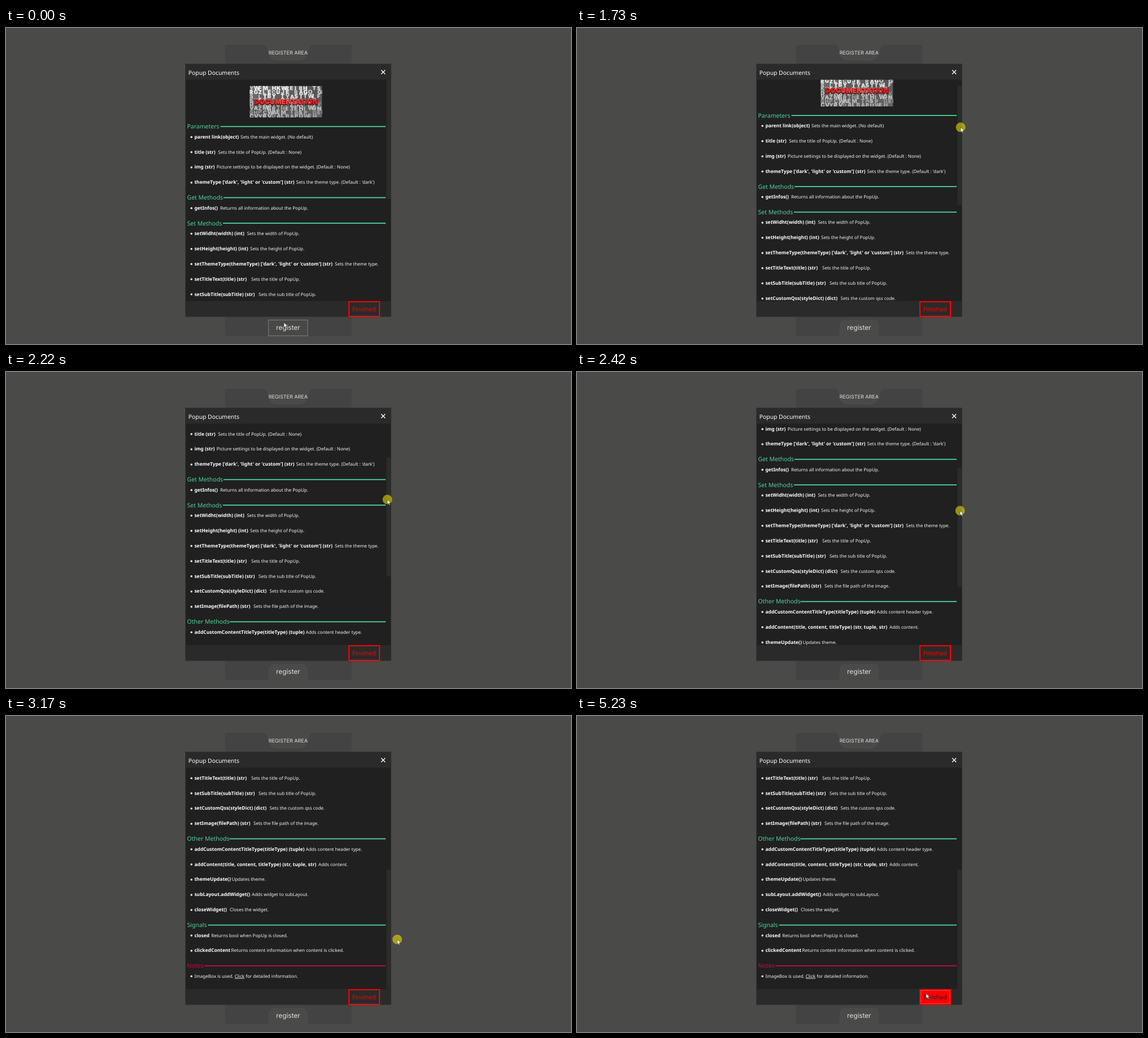
Recreate the animation shown at these times as an HTML page. Size 1000 by 560 pixels, loop 5.3 s.

```html
<!DOCTYPE html>
<html lang="en">
<head>
<meta charset="utf-8">
<title>Popup Documents</title>
<style>
  html, body { margin: 0; width: 100%; height: 100%; overflow: hidden; background: #4a4a48; }
  svg { display: block; width: 100%; height: 100%; }
  text { font-family: "Noto Sans", "Open Sans", sans-serif; white-space: pre; text-rendering: geometricPrecision; }
  .round { font-family: Inter, sans-serif; fill: #dde0e0; text-anchor: middle; }
  .head { font-size: 10.5px; }
  .name { font-size: 8.5px; font-weight: 700; fill: #fff; }
  .info { font-size: 8.05px; fill: #f6f6f6; }
  .link { text-decoration: underline; }
  .block { font-family: Inter, sans-serif; font-weight: 900; }
</style>
</head>
<body>
<svg id="stage" viewBox="0 0 1000 560" preserveAspectRatio="none">
  <defs>
    <clipPath id="view"><rect x="318" y="91.5" width="355" height="392.5"/></clipPath>
    <clipPath id="frame"><rect x="431.5" y="102.5" width="128" height="56"/></clipPath>
    <linearGradient id="slate" x2="1" y2="1">
      <stop offset="0" stop-color="#777"/>
      <stop offset=".5" stop-color="#555"/>
      <stop offset="1" stop-color="#666"/>
    </linearGradient>
    <linearGradient id="red" x2="1">
      <stop offset="0" stop-color="#dc1414"/>
      <stop offset=".5" stop-color="#f8504a"/>
      <stop offset="1" stop-color="#e01818"/>
    </linearGradient>
  </defs>

  <rect width="1000" height="560" fill="#4a4a48"/>
  <rect x="387.5" y="30" width="224" height="515.5" fill="#434343"/>
  <path d="M457 30C463 31 462 38 464 44Q468 58 481 58H518Q531 58 535 44C537 38 536 31 542 30Z" fill="#4a4a48"/>
  <text class="round" x="499.3" y="47.2" font-size="9">REGISTER AREA</text>
  <path id="tab" d="M464.5 545.5V529Q465 517 477 517H522Q534 517 534.5 529V545.5Z" fill="#4a4a48"/>
  <rect id="ring" x="464.5" y="517.5" width="69.5" height="28" fill="#484847" stroke="#7c8583" stroke-width=".9"/>
  <text class="round" x="499.3" y="535.4" font-size="11.8">register</text>

  <rect x="317.5" y="63.7" width="364" height="448.1" fill="#202020"/>
  <g clip-path="url(#view)"><g id="page"></g></g>
  <rect x="317.5" y="63.7" width="364" height="27.8" fill="#2a2a2a"/>
  <rect x="317.5" y="484" width="364" height="27.8" fill="#2a2a2a"/>
  <rect id="thumb" x="673.5" y="92" width="7.8" height="211" fill="#2b2b2b"/>
  <rect x="317.5" y="63.7" width="364" height="448.1" fill="none" stroke="#393939" stroke-width=".6"/>
  <text x="322.8" y="83.4" font-size="10.35" fill="#fff">Popup Documents</text>
  <path d="M664 74.5l7.2 7.2m0-7.2l-7.2 7.2" stroke="#fff" stroke-width="1.3"/>

  <rect id="button" x="607" y="485" width="54" height="26" stroke="#f00" stroke-width="2"/>
  <rect id="focus" x="608.5" y="486.5" width="51" height="23" fill="none" stroke="#ffa0a0" stroke-width=".8" stroke-dasharray="1 1"/>
  <text id="label" x="613" y="502" font-size="10.55">Finished</text>

  <g id="cursor">
    <circle id="press" r="8.5" fill="#fe0" fill-opacity=".53"/>
    <path d="M0 0V8.3L1.9 6.6L3.3 9.8L4.7 9.2L3.4 6.1H6Z" fill="#fff" stroke="#222" stroke-width=".5"/>
  </g>
</svg>
<script>
const $ = id => document.getElementById(id);
const LOOP = 5300, GREEN = '#4fd498', RED = '#d0063e';

function add(parent, tag, attrs, text) {
  const el = document.createElementNS('http://www.w3.org/2000/svg', tag);
  for (const k in attrs) el.setAttribute(k, attrs[k]);
  if (text) el.textContent = text;
  return parent.appendChild(el);
}

// heading, rule start, colour, items: [name, description, description x]
const sections = [
  ['Parameters', 379.5, GREEN, [
    ['parent link(object)', 'Sets the main widget. (No default)', 415],
    ['title (str)', 'Sets the title of PopUp. (Default : None)', 375.3],
    ['img (str)', 'Picture settings to be displayed on the widget. (Default : None)', 372.8],
    ["themeType ['dark', 'light' or 'custom'] (str)", "Sets the theme type. (Default : 'dark')", 513.6]]],
  ['Get Methods', 385, GREEN, [
    ['getInfos()', 'Returns all information about the PopUp.', 379]]],
  ['Set Methods', 384, GREEN, [
    ['setWidht(width) (int)', 'Sets the width of PopUp.', 426.4],
    ['setHeight(height) (int)', 'Sets the height of PopUp.', 432],
    ["setThemeType(themeType) ['dark', 'light' or 'custom'] (str)", 'Sets the theme type.', 582],
    ['setTitleText(title) (str)', 'Sets the title of PopUp.', 434],
    ['setSubTitle(subTitle) (str)', 'Sets the sub title of PopUp.', 447],
    ['setCustomQss(styleDict) (dict)', 'Sets the custom qss code.', 466.5],
    ['setImage(filePath) (str)', 'Sets the file path of the image.', 438]]],
  ['Other Methods', 395.5, GREEN, [
    ['addCustomContentTitleType(titleType) (tuple)', 'Adds content header type.', 530.5],
    ['addContent(title, content, titleType) (str, tuple, str)', 'Adds content.', 553],
    ['themeUpdate()', 'Updates theme.', 399.5],
    ['subLayout.addWidget()', 'Adds widget to subLayout.', 435],
    ['closeWidget()', 'Closes the widget.', 396]]],
  ['Signals', 357.5, GREEN, [
    ['closed', 'Returns bool when PopUp is closed.', 363.2],
    ['clickedContent', 'Returns content information when content is clicked.', 398.5]]],
  ['Notes', 351, RED, [['', 'ImageBox is used. ', 333.5]]]
];

function buildPicture(page) {
  const pic = add(page, 'g', { 'clip-path': 'url(#frame)' });
  add(pic, 'rect', { x: 431.5, y: 102.5, width: 128, height: 56, fill: 'url(#slate)' });
  const rows = ['YWFM HKWREIBH TS', 'RGZLECUJE RAGO GE', 'S LTBY TYASTTWIF', 'KWOTHE RGNEASLD',
    'D CNRTEFPENN PTV', 'VAZMBRTHEYEHIWGN', 'GHPCWAEM TASP GEH', 'CVYRVDALBAPUWEH'];
  let seed = 7;
  const rnd = () => (seed = seed * 16807 % 2147483647) / 2147483647;
  rows.forEach((row, r) => [...row].forEach((ch, i) => {
    const tone = Math.round((r < 3 ? 225 : 175) + (rnd() - .5) * 60);
    add(pic, 'text', {
      class: 'block', x: 430 + i * 8 + rnd(), y: 109.5 + r * 7.1 + rnd(),
      'font-size': 9 + rnd() * 1.5, fill: `rgb(${tone},${tone},${tone})`
    }, ch);
  }));
  const big = { class: 'block', x: 495.5, 'text-anchor': 'middle', 'font-size': 12.3 };
  add(pic, 'text', { ...big, y: 136, fill: '#5a0a0a', stroke: '#5a0a0a', 'stroke-width': 1.2 }, 'DOCUMENTATION');
  add(pic, 'text', { ...big, y: 134.8, fill: 'url(#red)' }, 'DOCUMENTATION');
}

function buildPage() {
  const page = $('page');
  buildPicture(page);
  let y = 174.4, info;
  for (const [title, rule, fill, items] of sections) {
    add(page, 'text', { class: 'head', x: 320.5, y: y + 3.8, fill }, title);
    add(page, 'rect', { x: rule, y: y - .7, width: 672 - rule, height: 1.8, fill });
    y += 18.4;
    for (const [name, text, x] of items) {
      add(page, 'circle', { cx: 328.2, cy: y + .4, r: 1.75, fill: '#f4f4f4' });
      add(page, 'text', { class: 'name', x: 333.4, y: y + 2.8 }, name);
      info = add(page, 'text', { class: 'info', x, y: y + 2.8 }, text);
      y += 26.9;
    }
  }
  add(info, 'tspan', { class: 'link' }, 'Click');
  add(info, 'tspan', {}, ' for detailed information.');
}

// Linear interpolation over rows of [position, value, value...]
function at(keys, p, col = 1) {
  let i = 1;
  while (i < keys.length - 1 && keys[i][0] < p) i++;
  const a = keys[i - 1], b = keys[i];
  const u = Math.min(1, Math.max(0, (p - a[0]) / (b[0] - a[0])));
  return a[col] + (b[col] - a[col]) * u;
}

const ticks = [[200, 0], [770, 8], [1520, 19], [2090, 27], [2630, 35], [3170, 43],
  [3720, 51], [4280, 59], [4830, 67], [5300, 74]];
const path = [[-1, 492, 522], [0, 494, 513], [3, 528, 402], [7, 582, 269], [8, 596, 239], [11, 645, 187],
  [15, 681, 165], [19, 680, 166], [22, 679, 176], [29, 675, 226], [36, 685.5, 295], [42, 692, 386],
  [43, 692.5, 396], [46, 682, 438], [50, 631, 493], [51, 618, 492], [54, 530, 478], [58, 416, 457],
  [60, 409, 459], [62, 428, 463], [66, 599, 488], [69, 618, 492]];
const scrolls = [[19, 0], [22, 19.6], [29, 110], [36, 235.5], [39.7, 335]];

const show = (id, on) => $(id).setAttribute('visibility', on ? 'visible' : 'hidden');

function draw(t) {
  const n = t < 200 ? -1 : Math.floor(at(ticks, t) + .06);
  const x = at(path, n, 1), y = at(path, n, 2), scroll = at(scrolls, n);
  const hover = x > 606 && x < 662 && y > 484 && y < 512;
  $('page').setAttribute('transform', `translate(0 ${-scroll})`);
  $('thumb').setAttribute('y', 92 + scroll * .539);
  $('cursor').setAttribute('transform', `translate(${x} ${y})`);
  $('button').setAttribute('fill', hover ? '#f00' : '#2a2a2a');
  $('label').setAttribute('fill', hover ? '#202020' : '#f00');
  show('press', (n >= 19 && n <= 44) || n === 72);
  show('focus', n >= 72);
  show('ring', n < 19);
  show('tab', n >= 19);
}

function loop() {
  draw(performance.now() % LOOP);
  requestAnimationFrame(loop);
}

buildPage();
loop();
</script>
</body>
</html>
```
